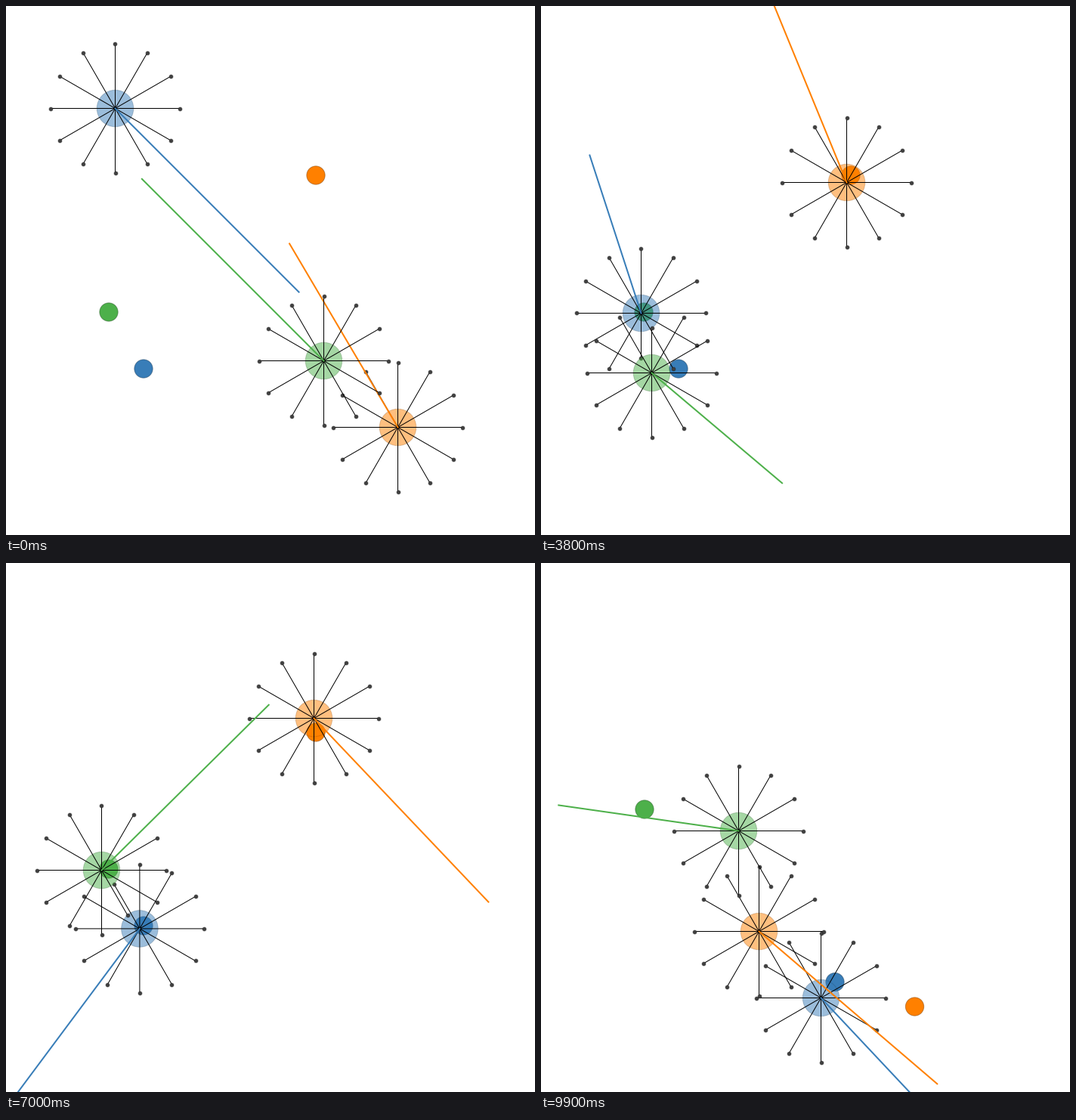
A matplotlib script that plays this animation: 700x700 px, repeating every 10 s.

```python
import numpy as np
import matplotlib.pyplot as plt
from matplotlib.animation import FuncAnimation

SIZE, FRAMES, RESET = 700, 100, 71
UNIT = SIZE / 2.88            # pixels per world unit
BODY, GOAL, RANGE = 0.1 * UNIT, 0.05 * UNIT, 0.35 * UNIT
PX = 0.72                     # one pixel in points at 100 dpi

BLUE, ORANGE, GREEN = COLORS = [(0.22, 0.49, 0.72), (1.0, 0.5, 0.0), (0.30, 0.69, 0.29)]

# Each round: length, goal spots, key steps, and per agent the
# x, y, push x, push y at those steps (y grows downwards).
ROUNDS = [
    (RESET, [(182, 480), (410, 224), (136, 405)], [0, 15, 38, 54, 70], {
        BLUE: [(144, 135, 1, 1), (220, 250, .03, 1), (132, 406, -.28, -.86),
               (138, 469, .99, 1), (176.4, 483.4, -.745, 1)],
        ORANGE: [(518, 557, -.59, -1), (451, 442, -.09, -1), (404, 233, -.41, -1),
                 (428.5, 248.5, -.9, .16), (407, 205, .95, 1)],
        GREEN: [(420, 469, -.99, -.99), (324, 437, -.92, -.18), (146, 485, .71, .6),
                (218.5, 421, -1, -1), (126, 406, .91, -.9)]}),
    (FRAMES - RESET, [(389, 554.5), (494.5, 587), (137, 326)], [8, 28], {
        BLUE: [(435, 396, -.59, 1), (370, 575, .94, 1)],
        ORANGE: [(260, 320, -.9, .9), (288, 487, .97, .83)],
        GREEN: [(321, 371, .72, .35), (261, 354, -.98, -.14)]}),
]


def response(n):
    """Position after each step caused by a unit push at every step."""
    x, v = np.zeros(n), np.zeros(n)
    rows = []
    for push in np.eye(n):
        v = 0.75 * v          # drag
        for _ in range(2):
            v = v + 0.05 * push
            x = x + 0.05 * v
        rows.append(x)
    return np.array(rows)


def plan(n, steps, pos, push):
    """Find smooth, bounded pushes that carry one axis through its key poses."""
    pos = (pos - SIZE / 2) / UNIT
    motion = np.hstack([np.ones((n, 1)), response(n)])
    pushes = np.hstack([np.zeros((n, 1)), np.eye(n)])
    C = np.vstack([motion[steps], pushes[steps]])
    target = np.concatenate([pos, push])

    # Prior: free start, pushes correlated over a few steps
    t = np.arange(n)
    W = np.zeros((n + 1, n + 1))
    W[0, 0] = 10
    W[1:, 1:] = np.exp(-(t[:, None] - t) ** 2 / 12.5) + 0.01 * np.eye(n)
    gain = W @ C.T @ np.linalg.inv(C @ W @ C.T)

    z = np.concatenate([pos[:1], np.interp(t, steps, push)])
    for _ in range(400):
        z[1:] = np.clip(z[1:], -1, 1)
        z = z + gain @ (target - C @ z)
    return motion @ z * UNIT + SIZE / 2, np.clip(z[1:], -1, 1)


def simulate(n, steps, keys):
    path, force = np.zeros((2, n, 3, 2))
    for i, color in enumerate(COLORS):
        k = np.array(keys[color])
        for a in range(2):
            path[:, i, a], force[:, i, a] = plan(n, steps, k[:, a], k[:, 2 + a])
    return path, force


runs = [simulate(n, steps, keys) for n, _, steps, keys in ROUNDS]
PATH = np.concatenate([path for path, _ in runs]) + 0.5   # pixel centres
FORCE = np.concatenate([force for _, force in runs])

ANGLES = np.arange(12) * np.pi / 6
DIRS = np.column_stack([np.cos(ANGLES), np.sin(ANGLES)])


def ray_ends(i, centers):
    """Ends of the sensor rays of agent i, cut where they meet another body."""
    reach = np.full(12, RANGE)
    for j in range(3):
        if j != i:
            d = centers[j] - centers[i]
            along = DIRS @ d
            gap = BODY ** 2 - (d @ d - along ** 2)
            hit = np.maximum(along - np.sqrt(np.maximum(gap, 0)), 0)
            hit[(gap <= 0) | (along <= 0)] = RANGE
            reach = np.minimum(reach, hit)
    return centers[i] + DIRS * reach[:, None]


fig = plt.figure(figsize=(7, 7), dpi=100, facecolor="white")
ax = fig.add_axes([0, 0, 1, 1])
ax.set(xlim=(0, SIZE), ylim=(SIZE, 0))
ax.axis("off")


def disc(radius, color, alpha, z):
    edge = tuple(c / 2 for c in color) + (alpha / 2,)
    return ax.add_patch(plt.Circle((0, 0), radius, fc=color + (alpha,), ec=edge,
                                   lw=PX, zorder=z))


goals = [disc(GOAL, c, 1, 1) for c in COLORS]
agents = []
for i, c in enumerate(COLORS):
    z = 10 * (i + 1)
    body = disc(BODY, c, 0.5, z)
    rays, = ax.plot([], [], color="black", lw=PX, zorder=z + 1)
    tips, = ax.plot([], [], "o", ms=0.02 * UNIT * PX, mfc=(.25, .25, .25),
                    mec=(.125, .125, .125, .5), mew=PX, zorder=z + 2)
    arrow, = ax.plot([], [], color=c, lw=2 * PX, zorder=z + 3)
    agents.append((body, rays, tips, arrow))


def draw(f):
    centers = PATH[f]
    for goal, spot in zip(goals, ROUNDS[int(f >= RESET)][1]):
        goal.center = spot
    for i, (body, rays, tips, arrow) in enumerate(agents):
        p = centers[i]
        ends = ray_ends(i, centers)
        body.center = tuple(p)
        spokes = np.full((12, 3, 2), np.nan)
        spokes[:, 0], spokes[:, 1] = p, ends
        rays.set_data(*spokes.reshape(-1, 2).T)
        tips.set_data(*ends.T)
        arrow.set_data(*np.array([p, p + FORCE[f, i] * UNIT]).T)
    return goals + [part for agent in agents for part in agent]


anim = FuncAnimation(fig, draw, frames=FRAMES, interval=100, repeat=True,
                     repeat_delay=0, blit=False)
plt.show()
```
